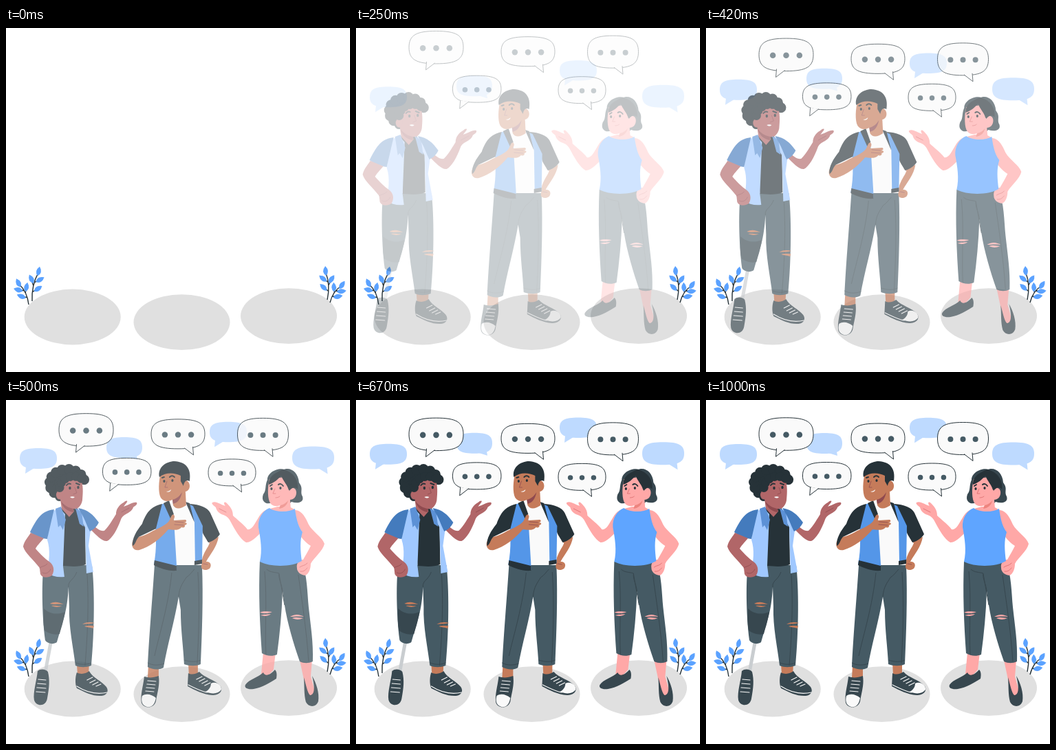
An HTML page for the animation above (1040 ms loop, 500 px wide and 500 px high).

```html
<!DOCTYPE html>
<html lang="en">
<head>
<meta charset="utf-8">
<title>Three people talking</title>
<style>
html, body { margin: 0; width: 100%; height: 100%; overflow: hidden; background: #fff; }
svg { display: block; width: 100%; height: 100%; }
.dark { fill: #263238; }
.shade { fill: #37474f; }
.pants { fill: #455a64; }
.white { fill: #fafafa; }
.skinA { fill: #b16668; }
.skinB { fill: #c57b5a; }
.skinC { fill: #ffa8a7; }
.seam { fill: none; stroke: #37474f; }
.brow { fill: none; stroke: #263238; stroke-width: 1.9; stroke-linecap: round; }
.fold { fill: none; stroke: #8f4a4f; stroke-width: .8; stroke-linecap: round; }
.lace { fill: none; stroke: #fafafa; stroke-width: 1.2; stroke-linecap: round; }
</style>
</head>
<body>
<svg viewBox="0 0 500 500">
<g fill="#e0e0e0">
  <ellipse cx="96.7" cy="420" rx="70" ry="40.4"/>
  <ellipse cx="255.5" cy="427.6" rx="70" ry="40.4"/>
  <ellipse cx="411" cy="418.6" rx="70" ry="40.4"/>
</g>
<g id="plants"></g>
<g id="clouds" fill="#bedaff"></g>

<g id="people">
  <!-- left: curly hair, open vest, prosthetic leg -->
  <g>
    <path d="M69 350L74 351L66 394L61 394Z" fill="#c9cdd0"/>
    <path class="skinB" d="M109 384H127L126 400L110 399Z"/>
    <path class="shade" d="M109 396C116 400 123 397 127 394C132 404 146 409 152 417C156 423 153 429 145 430C133 431 121 425 109 419C106 412 107 401 109 396Z"/>
    <path class="lace" d="M124 407l8-4M128 411l8-4M132 414l8-4M137 416l7-3M109 416C120 423 135 429 153 425"/>
    <path class="shade" d="M52 394C56 390 64 391 67 395C70 407 69 418 66 434C64 446 50 446 47 436C45 425 51 407 52 394Z"/>
    <path class="lace" d="M53 406l11 1M52 412l12 1M51 418l13 1M50 424l13 1"/>
    <path class="pants" d="M61 240H131C135 270 135 335 130 386C122 389 114 389 107 386C104 360 97 330 98 300L97 272C96 290 94 302 91 314L80 352C75 356 66 354 63 349C58 310 58 262 61 240Z"/>
    <path class="shade" d="M61 303C70 312 82 312 92 308C89 325 86 332 84 340C76 342 68 339 62 335C60 325 60 314 61 303Z"/>
    <path class="seam" d="M97 272C96 262 104 263 109 250M124 253C127 300 124 350 121 386M64 253C70 258 76 256 78 252M107 382C115 385 123 385 130 382"/>
    <path class="skinB" d="M70 296C77 292 83 294 90 297C83 296 77 298 70 296ZM72 299C79 298 83 300 88 299C82 302 76 301 72 299ZM117 326C124 322 130 323 135 324C129 326 123 325 117 326ZM120 329C126 327 130 329 134 328L133 332C128 330 124 331 120 329Z"/>
    <path class="skinA" d="M131 178C136 187 144 191 149 190C157 182 162 172 166 166C166 159 170 153 177 149C181 145 185 146 180 151L177 155C184 153 190 148 196 149C198 152 193 154 191 156C190 160 186 163 182 165C176 168 174 171 173 174C168 188 160 202 153 205C146 206 137 196 129 188Z"/>
    <path class="dark" d="M84 157L109 156L121 180L122 239C112 243 101 242 89 241Z"/>
    <g id="hair" class="dark"><ellipse cx="93" cy="122" rx="24" ry="20"/></g>
    <path class="skinA" d="M83 130L90 113H114C119 123 118 135 117 146C115 156 108 160 104 158L105 162L98 170L87 158Z"/>
    <path d="M86 147C91 154 98 157 104 158L104 163C95 162 88 156 86 147Z" fill="#8f4a4f"/>
    <ellipse class="skinA" cx="84" cy="138" rx="5" ry="6.5"/>
    <g id="fringe" class="dark"></g>
    <path class="brow" d="M94 124C96 121 98 121 100 122M108 121L113 123"/>
    <g class="dark"><ellipse cx="99" cy="128" rx="1.7" ry="2.2"/><ellipse cx="111" cy="127" rx="1.7" ry="2.2"/></g>
    <path class="fold" d="M106 127L109 135L104 137"/>
    <path class="white" d="M99 141C102 143 104 143 106 141C104 140 101 140 99 141Z"/>
    <path d="M71 163L84 157L92 166L89 241L91 257C81 258 73 256 65 252C69 235 71 218 66 203Z" fill="#a0c8ff"/>
    <path d="M110 158L119 162L129 190L126 212L133 250L123 252L121 185L112 170Z" fill="#a0c8ff"/>
    <path d="M78 158L86 155L93 174L89 189L85 182L82 185ZM107 157L116 163L119 184L113 180Z" fill="#5c91d6"/>
    <path d="M76 159C60 161 53 168 41 192C48 198 56 201 66 202L72 176ZM111 157C126 160 132 166 141 178C138 184 134 188 128 191C123 182 121 172 111 157Z" fill="#447bbd"/>
    <path class="skinA" d="M42 193L61 201C55 208 51 212 49 216C56 224 63 231 69 235C76 240 77 248 73 255C67 259 59 259 56 253L55 244C46 232 34 223 31 213C33 204 38 200 42 193Z"/>
    <path class="fold" d="M55 244C59 241 63 242 66 238M59 251C65 254 69 250 71 246M174 163L185 157"/>
  </g>

  <!-- middle: short hair, hand on chest -->
  <g>
    <path class="skinB" d="M213 386H228V404H212ZM271 382H285V400H272Z"/>
    <path class="shade" d="M207 402C213 404 220 404 228 401C230 414 226 425 224 438C221 449 206 449 203 440C201 429 206 414 207 402Z"/>
    <path class="white" d="M204 430C210 426 218 428 224 433C222 444 217 447 211 446C204 444 202 438 204 430Z"/>
    <path class="lace" d="M212 408l12 1M211 413l12 1M210 418l12 1M209 423l12 1"/>
    <path class="shade" d="M271 397C276 400 283 398 287 395C293 403 311 407 318 416C322 423 316 429 306 429C293 428 281 422 270 416Z"/>
    <path class="white" d="M304 412C312 408 320 415 319 421C315 427 306 428 296 424C300 422 304 418 304 412Z"/>
    <path class="lace" d="M283 406l8-4M287 409l8-4M291 412l8-4M295 415l8-4M271 414C283 420 291 424 299 425"/>
    <path class="pants" d="M222 240H291C293 285 291 340 289 384C283 387 273 387 265 384C264 360 260 335 260 305L257 286C251 322 241 354 235 389C228 393 219 392 212 388C214 345 218 300 222 240Z"/>
    <path class="seam" d="M257 286C258 271 264 265 268 258C273 255 277 249 280 246M247 251C242 300 229 340 222 372M285 250C288 295 286 345 284 383M212 382C219 386 228 386 236 383M265 378C275 381 283 381 289 378"/>
    <path class="white" d="M241 155L269 152L279 172L280 236C272 239 263 239 253 237L247 180Z"/>
    <path class="skinB" d="M298 204L315 199C313 213 303 224 297 235C303 234 306 240 302 245C298 248 291 248 290 243L291 232C293 222 300 214 302 208Z"/>
    <path class="dark" d="M273 151C288 152 299 156 303 164L317 195C313 201 307 205 300 207C296 199 291 195 291 187Z"/>
    <path d="M231 152L240 149L250 172L254 239V247C242 247 231 244 221 239C226 215 224 190 222 170Z" fill="#5496e8"/>
    <path d="M268 150L278 154L292 183L291 237L281 238L280 177Z" fill="#5496e8"/>
    <path class="dark" d="M222 233L254 241V248C242 249 231 245 221 240ZM280 234L291 232V238L280 240ZM235 150L243 146L250 166L245 172ZM267 148L273 150L280 178Z"/>
    <path class="skinB" d="M193 200C203 199 212 195 220 190C229 186 238 182 243 176C246 171 247 165 250 167C253 170 249 173 250 175L267 174C270 176 267 178 265 178C270 178 270 181 266 182C267 185 264 186 261 185C258 190 248 189 242 188C232 201 214 214 200 218C190 220 188 211 190 206Z"/>
    <path class="dark" d="M233 151C216 155 210 164 204 180C196 190 189 201 190 212C194 211 195 203 199 199L224 187Z"/>
    <path class="skinB" d="M231 106C228 118 227 134 231 142C235 148 242 148 248 145L249 153C253 160 261 158 268 153L267 133C275 132 275 119 268 117L258 104Z"/>
    <path d="M248 145C255 143 259 139 262 134C260 144 256 149 249 151Z" fill="#8f4a4f"/>
    <path class="dark" d="M229 112C226 98 239 89 251 89C267 90 276 99 273 118C268 115 265 119 264 125L260 118L260 110C250 105 238 105 229 112Z"/>
    <path class="brow" d="M233 113L236 112M244 112C247 109 249 110 251 112"/>
    <g class="dark"><ellipse cx="236" cy="118" rx="1.6" ry="2.1"/><ellipse cx="248" cy="117" rx="1.6" ry="2.1"/></g>
    <path class="fold" d="M240 118L237 127L241 127M252 177L264 178M251 181L264 182M293 238L299 239"/>
    <path class="white" d="M239 133C242 133 244 132 246 130C246 133 242 135 239 133Z"/>
  </g>

  <!-- right: bob cut, sleeveless top -->
  <g>
    <path class="skinC" d="M380 367H398L395 392L384 404L377 399ZM433 378H451L449 402L457 430L446 436L440 411Z"/>
    <path class="shade" d="M354 414C359 406 373 403 380 396C383 403 391 399 397 392C400 395 400 400 399 405C390 411 378 418 366 420C358 421 352 419 354 414Z"/>
    <path class="shade" d="M439 403C442 413 444 425 448 429C454 429 456 420 451 401C457 411 462 426 460 438C457 447 446 447 442 439C439 428 440 416 439 403Z"/>
    <path class="pants" d="M375 235H436C444 254 444 280 446 301C449 329 453 352 452 380C446 383 439 383 433 380C424 354 415 324 411 298L408 278C407 310 404 340 400 370C393 373 384 372 378 368C375 325 373 280 375 235Z"/>
    <path class="seam" d="M408 278C407 267 402 261 403 252C398 250 390 251 385 246M382 249C386 290 382 335 384 370M431 254C436 290 443 335 446 380M411 298L403 253"/>
    <path class="skinC" d="M375 309C382 306 387 308 393 308C386 311 380 310 375 309ZM376 313C381 311 387 312 391 311C386 315 381 314 376 313ZM419 315C427 310 434 312 439 315C431 314 425 315 419 315ZM422 317C428 315 433 317 438 317C432 320 426 319 422 317Z"/>
    <path class="skinC" d="M386 159C376 162 373 172 367 181C364 186 360 189 357 188C351 180 341 173 336 168C336 161 333 156 328 151C324 146 321 149 325 154C318 152 311 146 306 149C304 151 309 154 311 156C312 161 316 165 322 167C327 169 329 171 331 174C339 189 347 203 355 207C363 208 374 195 382 187Z"/>
    <path class="skinC" d="M386 159L401 155H418L427 160C437 161 442 172 446 181C452 192 466 199 469 209C467 219 453 230 449 238C449 246 446 253 441 255C434 254 429 250 429 244C428 237 432 232 438 232C442 225 446 218 449 212C441 207 434 199 431 192L420 170H390Z"/>
    <path d="M389 157C397 163 416 164 426 158C428 171 430 183 437 192C433 205 434 218 436 234C422 243 390 243 375 235C379 218 376 202 373 185C372 172 379 161 389 157Z" fill="#5fa5ff"/>
    <path class="shade" d="M408 102C418 96 431 104 432 120C439 129 433 133 437 140C440 149 430 151 421 148C413 157 408 149 410 140Z"/>
    <path class="shade" d="M411 101C400 98 386 106 386 116C382 125 385 131 380 137C376 148 385 153 393 149L404 122Z"/>
    <path class="skinC" d="M389 115C386 128 386 145 391 151C396 156 402 154 405 153L401 158C407 162 416 163 420 158L419 145C429 145 431 130 424 128C420 127 418 130 417 131L411 112Z"/>
    <path d="M405 153C410 152 414 149 416 146C415 153 410 157 403 158Z" fill="#ed847e"/>
    <path class="dark" d="M408 101C398 106 388 110 388 123C395 121 402 115 406 110C409 118 415 123 418 132C422 126 428 126 430 130C432 118 425 104 408 101Z"/>
    <path class="brow" d="M390 125L393 123M402 123C404 121 407 122 409 125"/>
    <g class="dark"><ellipse cx="392" cy="129" rx="1.6" ry="2.1"/><ellipse cx="405" cy="128" rx="1.6" ry="2.1"/></g>
    <path class="fold" d="M397 129L394 136L398 136M398 142C401 142 403 141 404 140M433 243C437 240 441 241 444 237M434 249C440 250 442 246 444 244M316 158L326 163" style="stroke:#d9696b"/>
  </g>
</g>

<g id="bubbles" fill="#fafafa" stroke="#263238"></g>
</svg>
<script>
const $ = id => document.getElementById(id);
const add = (id, markup) => $(id).insertAdjacentHTML('beforeend', markup);

const leaf = (x, y, angle) => `<path fill="#5ba2ff" d="M-7 0Q-1 -7 7 0Q-1 7 -7 0Z"
  transform="translate(${x} ${y}) rotate(${angle - 90})"/>`;

// A bent stem with a leaf at its tip, one on the outer side and two on the inner; side is 1 or -1
function sprig(x, y, tipX, tipY, side) {
  const length = Math.hypot(tipX - x, tipY - y);
  const lean = Math.atan2(tipX - x, y - tipY) * 180 / Math.PI;
  const at = f => -f * length;
  add('plants', `<g transform="translate(${x} ${y}) rotate(${lean}) scale(${side} 1)">
    <path fill="none" stroke="#263238" stroke-width="1.4" d="M0 0Q-6 ${at(.5)} 0 ${at(.95)}
      M-3 ${at(.5)}L-7 ${at(.65)}M-3 ${at(.6)}L3 ${at(.72)}M-2 ${at(.3)}L3 ${at(.42)}"/>
    ${leaf(0, at(1), 0)}${leaf(-8, at(.7), -38)}${leaf(4.5, at(.74), 48)}${leaf(4.5, at(.44), 44)}</g>`);
}
sprig(38, 397, 47.5, 353.5, 1);
sprig(33, 402, 18, 370.5, -1);
sprig(467, 395, 464.5, 353, -1);
sprig(471, 399, 488.5, 373.5, 1);

// Circles strung evenly along an arc, angles in degrees
function curls(id, cx, cy, rx, ry, from, to, count, r) {
  for (let i = 0; i < count; i++) {
    const a = (from + (to - from) * i / (count - 1)) * Math.PI / 180;
    add(id, `<circle cx="${cx + rx * Math.cos(a)}" cy="${cy + ry * Math.sin(a)}" r="${r}"/>`);
  }
}
curls('hair', 95, 121, 25.5, 20.5, 115, 345, 11, 7.5);
curls('fringe', 104, 129, 20, 18, 185, 305, 6, 6.5);

// Rounded body with a tail whose tip lies tipX from the centre and drop below the body
function bubble(id, cx, cy, w, h, tipX, drop) {
  const rx = w / 2, ry = h / 2, kx = rx * .74, ky = ry * .74;
  const x = cx + tipX, bottom = cy + ry, inward = -Math.sign(tipX);
  add(id, `<path d="M${cx - rx} ${cy}c0 ${-ky} ${rx - kx} ${-ry} ${rx} ${-ry}s${rx} ${ry - ky} ${rx} ${ry}
    s${kx - rx} ${ry} ${-rx} ${ry}s${-rx} ${ky - ry} ${-rx} ${-ry}z"/>
    <path d="M${x + inward} ${bottom - 3}L${x} ${bottom + drop}L${x + inward * 13} ${bottom - 1}"/>`);
}
function talk(cx, cy, w, h, tipX) {
  bubble('bubbles', cx, cy, w, h, tipX, 9);
  for (const i of [-1, 0, 1])
    add('bubbles', `<circle class="pants" stroke="none" cx="${cx + i * w * .245}" cy="${cy + 1}" r="${w * .054}"/>`);
}
bubble('clouds', 47, 79, 54, 30, -19, 7);
bubble('clouds', 172, 63, 52, 30, 19, 3);
bubble('clouds', 323, 40.5, 54, 29.5, -20, 7);
bubble('clouds', 446.5, 78, 61, 33, 21, 7);
talk(116.5, 49.5, 79, 47.5, -15);
talk(250, 55.5, 78, 43, 22.5);
talk(373.5, 56, 74, 47, 14.5);
talk(175.7, 110, 70.5, 39, -25);
talk(328.5, 111.5, 69, 39, 14);

// cubic-bezier(.36, -.01, .5, 1.38)
function ease(x) {
  const cubic = (u, a, b) => 3 * (1 - u) ** 2 * u * a + 3 * (1 - u) * u * u * b + u ** 3;
  let lo = 0, hi = 1;
  for (let i = 0; i < 30; i++) {
    const mid = (lo + hi) / 2;
    if (cubic(mid, .36, .5) < x) lo = mid; else hi = mid;
  }
  return cubic(hi, -.01, 1.38);
}

const LOOP = 1040, REST = 40, LEAD = 38, LENGTH = 1020, SHIFT = 30;
const layers = { clouds: [0, 1], people: [-1, 0], bubbles: [0, -1] };
const start = performance.now();
function draw() {
  const time = (performance.now() - start) % LOOP;
  const p = time < REST ? 0 : ease(Math.min(1, (time + LEAD) / LENGTH));
  const away = SHIFT * (1 - p);
  for (const id in layers) {
    const [dx, dy] = layers[id];
    $(id).setAttribute('transform', `translate(${dx * away} ${dy * away})`);
    $(id).setAttribute('opacity', Math.max(0, Math.min(1, p)));
  }
  requestAnimationFrame(draw);
}
draw();
</script>
</body>
</html>
```
